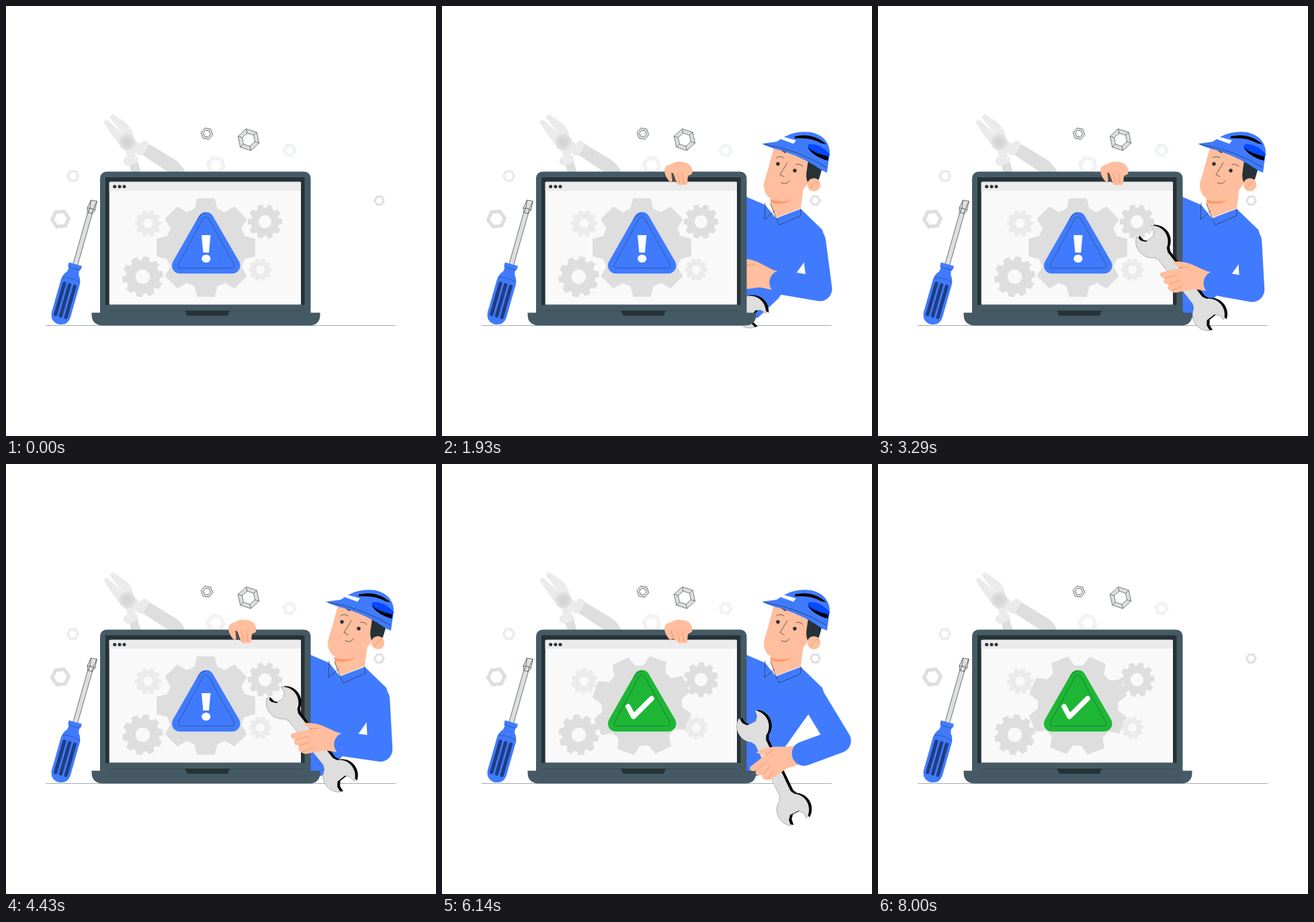
Recreate the animation shown at these times as an HTML page. Size 640 px wide and 640 px high, loop 8070 ms.

```html
<!DOCTYPE html>
<html lang="en">
<head>
<meta charset="utf-8">
<title>Repair</title>
<style>
html, body { margin: 0; width: 100%; height: 100%; overflow: hidden; background: #fff; }
svg { display: block; width: 100vw; height: 100vh; }
.blue { fill: #407bff; }
.steel { fill: #455a64; }
.dark { fill: #263238; }
.grey { fill: #dedede; }
.light { fill: #ebebeb; }
.skin { fill: #ffbe9d; }
.line { fill: none; stroke: #263238; stroke-width: .7; stroke-linecap: round; stroke-linejoin: round; }
.edge { stroke: #263238; stroke-width: .6; stroke-linejoin: round; }
.thin { stroke-width: .3; }
.crease { fill: none; stroke: #ed8f66; stroke-width: .8; stroke-linecap: round; }
.round { stroke-linejoin: round; stroke-linecap: round; }
</style>
</head>
<body>
<svg viewBox="0 0 640 640">
  <defs>
    <clipPath id="floor"><path d="M0 0H640V475.500H0Z"/></clipPath>
    <g id="wrenchShape">
      <path id="jaw" d="M-13-89A24 24 0 0 0-12-48L-9-42V0H9V-42L12-48A24 24 0 0 0 13-89L12-80L7-74H-7L-12-80Z" />
      <use href="#jaw" transform="rotate(180)"/>
    </g>
  </defs>

  <path d="M59 475.500H580" stroke="#a6abae" stroke-width="1"/>

  <g id="pliers">
    <path class="light" d="M145 172L150 169L171 187L185 191L193 203L187 219L176 214L166 203L154 187Z"/>
    <path class="light" d="M154 165L159 161L179 174Q187 181 190 194L178 192L168 183Z"/>
    <path class="grey" d="M183 235L196 231L201 248H187Z"/>
    <path class="grey" d="M212 205L250 228Q262 235 267 248H243L202 221Z"/>
    <path class="light" d="M187 195L201 207L193 219L183 230L176 211Z"/>
    <path class="light round" d="M206 207L200 216M181 231L190 228" stroke="#ebebeb" stroke-width="13"/>
    <circle class="grey" cx="180.500" cy="202.500" r="12"/>
    <circle cx="180.500" cy="202.500" r="7.500" fill="#d5d5d5"/>
    <circle class="light" cx="192" cy="216" r="3.500"/>
  </g>
  <g id="nuts"></g>

  <g transform="translate(130.500 289) rotate(15.900)">
    <path class="grey edge" d="M-3.500 18H3.500V102H-3.500Z"/>
    <path class="grey edge" d="M-4 1L5 0L6 14L3 20H-3L-6 14ZM-4 1L-2 13L-3 20M5 0L3 13L3 20M-6 14L-2 13H3L6 14"/>
    <path class="blue" d="M-10 99H10V104L8 107L9 113Q14 119 14.500 126V178Q13 191 0 192Q-13 191-14.500 178V126Q-14 119-9 113L-8 107L-10 104Z"/>
    <path class="line" d="M-9 106H9M-13 123Q0 119 13 123" opacity=".6"/>
    <path class="round" d="M-8 131V179M0 131V179M8 131V179" stroke="#203d80" stroke-width="5.200"/>
  </g>

  <g id="backHand">
    <path class="skin" d="M331 250Q332 240 340 236Q347 231 355 232Q364 232 369 237Q374 243 372 251L366 268H340Z"/>
  </g>

  <g id="manClip">
    <g id="man">
      <path class="blue" d="M425 275L453 284L481 296L497 316L534 302L566 333L570 345L548 369L537 384L500 436L470 464H425Z"/>
      <path class="skin" d="M491 283L489 294L497 315L534 301L538 270Z"/>
      <path d="M488 287Q501 294 520 288Q510 297 490 293Z" fill="#ff996c"/>
      <path class="line" d="M481 293L480 318L495 305M489 294L497 316L502 326L534 312V302"/>
      <path class="skin" d="M494 211L486 240L479 264Q478 280 490 287Q504 293 517 289Q532 283 543 266L556 235L530 215Z"/>
      <path class="dark" d="M545 230L566 241L561 258L552 264L544 262Q541 255 543 244ZM502 213L514 216L511 219Z"/>
      <circle class="skin" cx="553.500" cy="266" r="9.800"/>
      <path class="crease" d="M549 271Q554 261 559 261"/>
      <circle class="dark" cx="500" cy="235" r="2.700"/>
      <circle class="dark" cx="525" cy="245" r="2.700"/>
      <path class="line" d="M498 226Q503 222 509 226M527 236Q533 234 537 239M514 233L503 251L509 254M505 263Q513 267 517 260"/>
      <path class="blue" d="M476 205L498 202L511 194Q528 185 550 188Q574 194 577 215L576 226L573 248L566 245Q540 226 505 215Q488 211 476 205Z"/>
      <path d="M504 198L509 195L527 200L523 205Z" fill="#fff"/>
      <path d="M525 194Q553 188 572 206L564 204Q549 195 525 197Z"/>
      <path d="M545 206Q561 203 577 220L575 230Q556 224 545 212Z" fill="#0648ff"/>
      <path d="M544 210Q553 219 575 224L574 230Q552 224 544 210Z"/>
      <path class="line" d="M480 206Q530 214 572 240"/>
      <g id="backArm"></g>
    </g>
  </g>

  <g id="laptop">
    <path class="steel" d="M151 246.500H442.500Q453.500 246.500 453.500 257.500V456.500H467.500V460Q467 475.500 451 475.500H144Q128 475 127.500 460V456.500H140V257.500Q140 246.500 151 246.500Z"/>
    <path class="dark" d="M148 255H444.500V445H148ZM266 453.500H333L330 461H270Z"/>
    <path d="M153.700 262H439V444.500H153.700Z" fill="#f9f9f9"/>
    <path class="light" d="M153.700 263.500Q153.700 261.500 156 261.500H437Q439 261.500 439 263.500V275H153.700Z"/>
    <path class="line" d="M154 453.500H439" opacity=".6"/>
    <circle class="dark" cx="161.700" cy="268.700" r="2.500"/>
    <circle class="dark" cx="169" cy="268.700" r="2.500"/>
    <circle class="dark" cx="176" cy="268.700" r="2.500"/>
  </g>
  <g id="gears"></g>

  <g id="sign" class="round">
    <path id="plate" d="M297.500 318.700L259 386.300H336.500Z" stroke-width="24"/>
    <path class="line" style="stroke-width:.5" d="M293 317Q297.500 311 302 317L339 384Q341 390 335 390H260Q254 390 257 384ZM285 318Q289 309 297 308"/>
    <g id="alert" fill="#fff">
      <path d="M291 341H304.500L302 367H293.500Z"/>
      <ellipse cx="297.800" cy="376" rx="6.600" ry="6"/>
    </g>
    <path id="check" d="M277 361L285 376L312 349" fill="none" stroke="#fff" stroke-width="7.500"/>
  </g>

  <g id="fingers">
    <path id="gap" d="M341 247H346L350 263L343 260Z"/>
    <path class="skin" d="M331 244Q333 236 340 236H366Q374 240 372 250L366 253L365 265Q362 268 358 266Q353 268 350 265L344 249L341 248L343 260Q340 264 336 258Q331 251 331 244Z"/>
    <path class="crease" d="M341 248L347 262M350 249L354 264M358 249L360 264"/>
  </g>

  <g id="frontArm">
    <g id="arm">
      <g id="wrench">
        <use id="shade" href="#wrenchShape"/>
        <use class="grey edge thin" href="#wrenchShape"/>
        <path class="grey" d="M-8.700-25H8.700V25H-8.700Z"/>
      </g>
      <g id="hand">
        <path class="skin" d="M508 400L490 396L468 386Q454 381 440 382Q443 388 452 391L423 398Q419 401 423 405L428 407Q424 412 429 415L434 416Q430 422 436 425Q441 430 450 427L472 423L506 428Z"/>
        <path class="crease" d="M428 407L446 402M434 416L450 410M439 425L454 418M452 391L463 390"/>
      </g>
      <polyline id="sleeve" class="round" fill="none" stroke="#407bff" stroke-width="36.500"/>
    </g>
  </g>
</svg>
<script>
const LOOP = 8070;
const $ = id => document.getElementById(id);
const RAD = Math.PI / 180;
const polar = (r, deg) => [r * Math.cos(deg * RAD), r * Math.sin(deg * RAD)];
const toPath = points => 'M' + points.map(p => p.map(v => v.toFixed(2)).join(' ')).join('L') + 'Z';
const hexagon = (r, turn) => Array.from({ length: 6 }, (_, i) => polar(r, turn + i * 60));

function addPath(parent, d, attrs) {
  const path = document.createElementNS('http://www.w3.org/2000/svg', 'path');
  path.setAttribute('d', d);
  for (const name in attrs) path.setAttribute(name, attrs[name]);
  parent.append(path);
  return path;
}

function addNut(x, y, outer, inner, turn, fill, outlined, faceted) {
  const rim = hexagon(outer, turn), hole = hexagon(inner, turn);
  const attrs = { fill, 'fill-rule': 'evenodd', transform: `translate(${x} ${y})` };
  let d = toPath(rim) + toPath(hole);
  if (outlined) attrs.class = 'edge';
  if (faceted) d += rim.map((p, i) => `M${p}L${hole[i]}`).join('');
  addPath($('nuts'), d, attrs);
}
addNut(99.5, 253, 10, 6, 0, '#ebebeb');
addNut(81, 317, 15.5, 9.5, -6, '#dedede');
addNut(555.5, 289.5, 8.5, 5.3, 0, '#dedede');
addNut(422, 215, 11, 5.3, 10, '#f1f4f4');
addNut(312, 237, 15.5, 8.5, 10, '#f3f3f3');
addNut(361, 199, 16.5, 10, -42, '#dedede', true, true);
addNut(299, 190, 9, 5.2, 10, '#dedede', true);

function addGear(x, y, teeth, phase, outer, root, hole, fill) {
  const step = 360 / teeth, points = [];
  for (let i = 0; i < teeth; i++) {
    const mid = phase + i * step - 90;
    points.push(polar(root, mid - step * .37), polar(outer, mid - step * .225),
      polar(outer, mid + step * .225), polar(root, mid + step * .37));
  }
  const ring = hole ? `M${hole} 0A${hole} ${hole} 0 1 0 ${-hole} 0A${hole} ${hole} 0 1 0 ${hole} 0Z` : '';
  const node = addPath($('gears'), toPath(points) + ring, { fill, 'fill-rule': 'evenodd' });
  return { node, x, y };
}
const gears = [
  addGear(297.5, 359.5, 8, 0, 74.5, 60, 0, '#dedede'),
  addGear(385.5, 321, 10, 18, 26, 21, 9.7, '#dedede'),
  addGear(203.5, 403, 10, 10, 30.5, 25, 10.7, '#dedede'),
  addGear(211.5, 323.5, 10, 18, 20, 16, 7, '#ebebeb'),
  addGear(378.5, 392.5, 10, 18, 17, 13.7, 6.4, '#ebebeb')
];

const smooth = u => u * u * (3 - 2 * u);
const ramp = (t, from, to) => Math.min(1, Math.max(0, (t - from) / (to - from)));

// Elbow x, y, cuff x, y, hand turn, wrench x, y, wrench turn
const HIDDEN = [541, 430, 480, 400, 20, 351, 389, -80];
const SWUNG = [601, 405, 552, 432, -28, 501, 455, 0];
const LOWERED = [592, 412, 541, 431, -25, 486.5, 452.5, -8.7];
const WORKING = [557, 423, 504, 414, 0, 451, 406.5, -37.8];
const LEAVING = [590.5, 412, 539, 431, -25, 492.5, 452.5, -25.7];
const armKeys = [
  [0, HIDDEN], [1750, HIDDEN], [2200, SWUNG], [2430, LOWERED], [3000, WORKING],
  [5720, WORKING], [6140, LEAVING], [6350, SWUNG], [6700, HIDDEN], [LOOP, HIDDEN]
];

function armPose(t) {
  const i = armKeys.findIndex(key => key[0] > t);
  const [start, a] = armKeys[i - 1], [end, b] = armKeys[i];
  const u = smooth(ramp(t, start, end));
  return a.map((v, k) => v + (b[k] - v) * u);
}

const WORK_START = 3285, WORK_CYCLE = 755, FIXED = WORK_START + 3 * WORK_CYCLE;

function drawArm(t) {
  let [ex, ey, cx, cy, turn, wx, wy, tilt] = armPose(t);
  const cos = Math.cos(tilt * RAD), sin = Math.sin(tilt * RAD);
  if (t > WORK_START && t < FIXED) {
    const push = -38 * Math.sin((t - WORK_START) / WORK_CYCLE * 2 * Math.PI);
    const dx = -sin * push, dy = cos * push;
    cx += dx;
    cy += dy;
    wx += dx;
    wy += dy;
    ey += dy / 2;
  }
  $('sleeve').setAttribute('points', `553,350 ${ex},${ey} ${cx},${cy}`);
  $('hand').setAttribute('transform', `translate(${cx} ${cy}) rotate(${turn}) translate(-504 -414)`);
  $('wrench').setAttribute('transform', `translate(${wx} ${wy}) rotate(${tilt})`);
  // The shadow always falls to the right, whatever the wrench's turn
  $('shade').setAttribute('transform', `translate(${4 * cos - sin} ${-4 * sin - cos})`);
  const layer = $(t > 2150 && t < 6250 ? 'frontArm' : 'backArm');
  if ($('arm').parentNode !== layer) layer.append($('arm'));
}

function drawMan(t) {
  const away = 2.1 * (1 - ramp(t, 1070, 1500) + ramp(t, 6500, 6960));
  $('man').setAttribute('transform',
    `translate(${476 - 92 * away} ${205 + 32 * away}) rotate(${-6 * away}) translate(-476 -205)`);
  $('manClip').style.display = t < 1100 || t > 6960 ? 'none' : '';
  if (away > 0) $('manClip').setAttribute('clip-path', 'url(#floor)');
  else $('manClip').removeAttribute('clip-path');
}

function drawHand(t) {
  const up = smooth(ramp(t, 110, 500)) - smooth(ramp(t, 7250, 7500));
  const grip = smooth(ramp(t, 590, 930)) - smooth(ramp(t, 7000, 7250));
  $('backHand').setAttribute('transform', `translate(0 ${17 * (1 - up)})`);
  $('backHand').style.display = up > 0 ? '' : 'none';
  $('fingers').setAttribute('transform', `translate(0 244) scale(1 ${grip}) translate(0 -244)`);
  $('fingers').style.display = grip > 0 ? '' : 'none';
  $('gap').setAttribute('class', t < 5860 ? 'dark' : 'skin');
}

function drawScreen(t) {
  const fixed = t >= FIXED, color = fixed ? '#1db735' : '#407bff';
  $('plate').setAttribute('fill', color);
  $('plate').setAttribute('stroke', color);
  $('alert').style.display = fixed ? 'none' : '';
  $('check').style.display = fixed ? '' : 'none';
  const spin = Math.max(0, t - 5426) * .0266;
  for (const { node, x, y } of gears) node.setAttribute('transform', `translate(${x} ${y}) rotate(${spin})`);
}

const began = performance.now();
function frame() {
  const t = (performance.now() - began) % LOOP;
  drawHand(t);
  drawMan(t);
  drawArm(t);
  drawScreen(t);
  requestAnimationFrame(frame);
}
frame();
</script>
</body>
</html>
```
